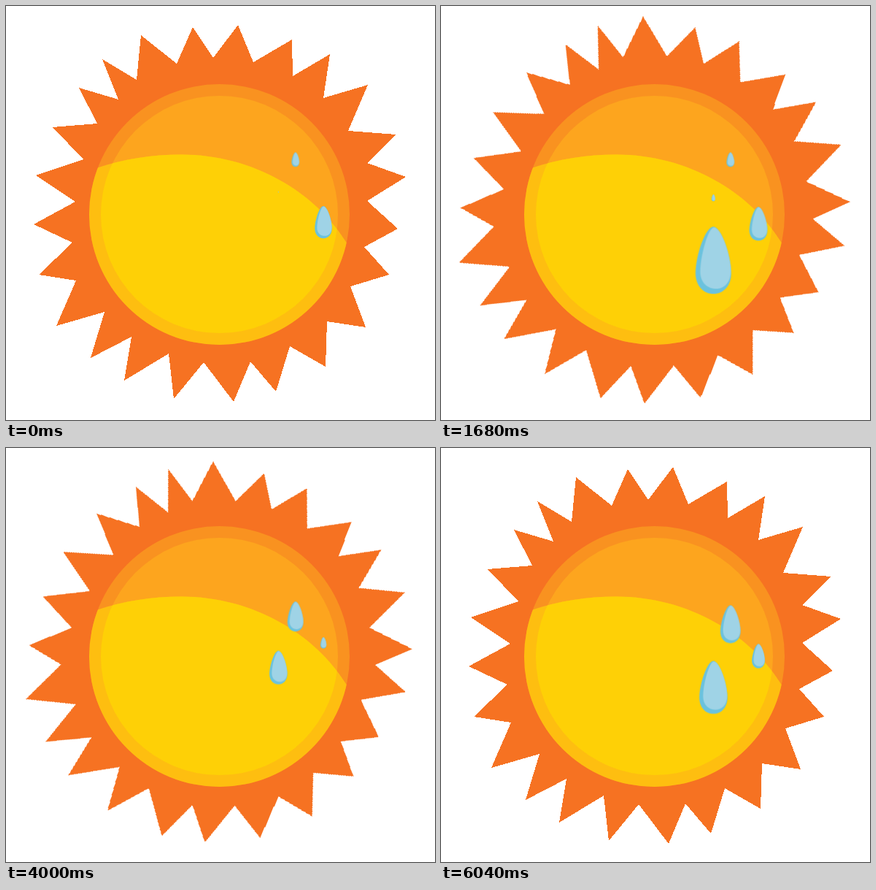
These frames come from a looping animation (588x567 px, 6.08 s). An HTML page without scripts:

```html
<!DOCTYPE html>
<html lang="en">
<head>
<meta charset="utf-8">
<title>Hot sun</title>
<style>
  html, body { margin: 0; width: 100%; height: 100%; overflow: hidden; background: #fff; }
  svg { display: block; width: 588px; height: 567px; }

  .rays {
    fill: #f67222;
    transform-origin: 290.2px 283.5px;
    animation: sway 6080ms cubic-bezier(.37, 0, .63, 1) infinite;
  }
  @keyframes sway {
    0%       { transform: rotate(0deg) scale(1); }
    16.447%  { transform: rotate(15.7deg) scale(1.07); }
    32.895%  { transform: rotate(22deg) scale(1); }
    49.342%  { transform: rotate(25.8deg) scale(1.069); }
    65.789%  { transform: rotate(22deg) scale(1); }
    81.414%  { transform: rotate(14.8deg) scale(1.068); }
    99.507%, 100% { transform: rotate(0deg) scale(1); }
  }

  /* --b: birth time of a drop within the loop */
  .drops use { animation: drip 6080ms linear calc(var(--b) - 6080ms) infinite; }
  @keyframes drip {
    0%      { transform: scale(0); opacity: 1; }
    28.125% { transform: scale(.8906); opacity: 1; }
    31.579% { transform: scale(1); opacity: 0; }
    100%    { transform: scale(1); opacity: 0; }
  }

  /* drops cut by the loop seam */
  .drops .head { animation-name: drip, head; }
  .drops .tail { animation-name: drip, tail; }
  .drops .head, .drops .tail {
    animation-duration: 6080ms;
    animation-timing-function: linear, step-end;
    animation-delay: calc(var(--b) - 6080ms), 0ms;
    animation-iteration-count: infinite;
  }
  @keyframes head { 0% { visibility: visible; } 35%, 100% { visibility: hidden; } }
  @keyframes tail { 0% { visibility: hidden; } 70%, 100% { visibility: visible; } }
</style>
</head>
<body>
<svg viewBox="0 0 588 567" xmlns="http://www.w3.org/2000/svg">
  <defs>
    <clipPath id="lit">
      <path d="M100 229L124 222C162 209 201 203.5 240 203.5C340 203.5 424 256 466 323L484 352V480H100Z"/>
    </clipPath>
    <g id="drop">
      <path fill="#6ac2de" d="M0 0C12 0 26.6 44 26.6 69C26.6 88 15 100 0 100S-26.6 88 -26.6 69C-26.6 44 -12 0 0 0Z"/>
      <path fill="#9fd3e6" d="M1 1C12 2 26 43 26 66C26 83 16 92.4 4 92.4S-19.6 84 -19.6 67C-19.6 44 -8 1 1 1Z"/>
    </g>
  </defs>

  <polygon class="rays" shape-rendering="crispEdges" points="
    318,26 339,77 392,46 393,96 444,66 435,126 496,108 469,171
    534,176 495,215 548,234 495,267 537,305 491,330 525,368 472,384
    493,440 440,432 438,494 389,466 370,528 335,487 312,542 271,488
    230,538 223,476 162,513 172,453 116,482 135,419 69,438 96,376
    45,368 91,324 38,299 95,268 41,232 106,210 64,166 125,161
    100,112 154,128 132,73 179,101 185,40 234,79 256,29 284,71"/>

  <g>
    <circle cx="292.5" cy="285.5" r="178.5" fill="#f99220"/>
    <circle cx="292.5" cy="285.5" r="162.5" fill="#fda51e"/>
  </g>
  <g clip-path="url(#lit)">
    <circle cx="292.5" cy="285.5" r="178.5" fill="#febe10"/>
    <circle cx="292.5" cy="285.5" r="162.5" fill="#fed006"/>
  </g>

  <g class="drops">
    <g transform="translate(396.7 191) scale(.701)">
      <use href="#drop" y="47" class="head" style="--b:-543ms"/>
      <use href="#drop" y="47" style="--b:1134ms"/>
      <use href="#drop" y="47" style="--b:2877ms"/>
      <use href="#drop" y="47" class="tail" style="--b:4618ms"/>
    </g>
    <g transform="translate(435 251) scale(.676)">
      <use href="#drop" y="52" class="head" style="--b:-1255ms"/>
      <use href="#drop" y="52" style="--b:365ms"/>
      <use href="#drop" y="52" style="--b:1963ms"/>
      <use href="#drop" y="52" style="--b:3560ms"/>
      <use href="#drop" y="52" class="tail" style="--b:5095ms"/>
    </g>
    <g transform="translate(373.3 253) scale(1.033)">
      <use href="#drop" y="53.5" class="head" style="--b:-29ms"/>
      <use href="#drop" y="53.5" style="--b:1507ms"/>
      <use href="#drop" y="53.5" style="--b:3145ms"/>
      <use href="#drop" y="53.5" class="tail" style="--b:4697ms"/>
    </g>
  </g>
</svg>
</body>
</html>
```
